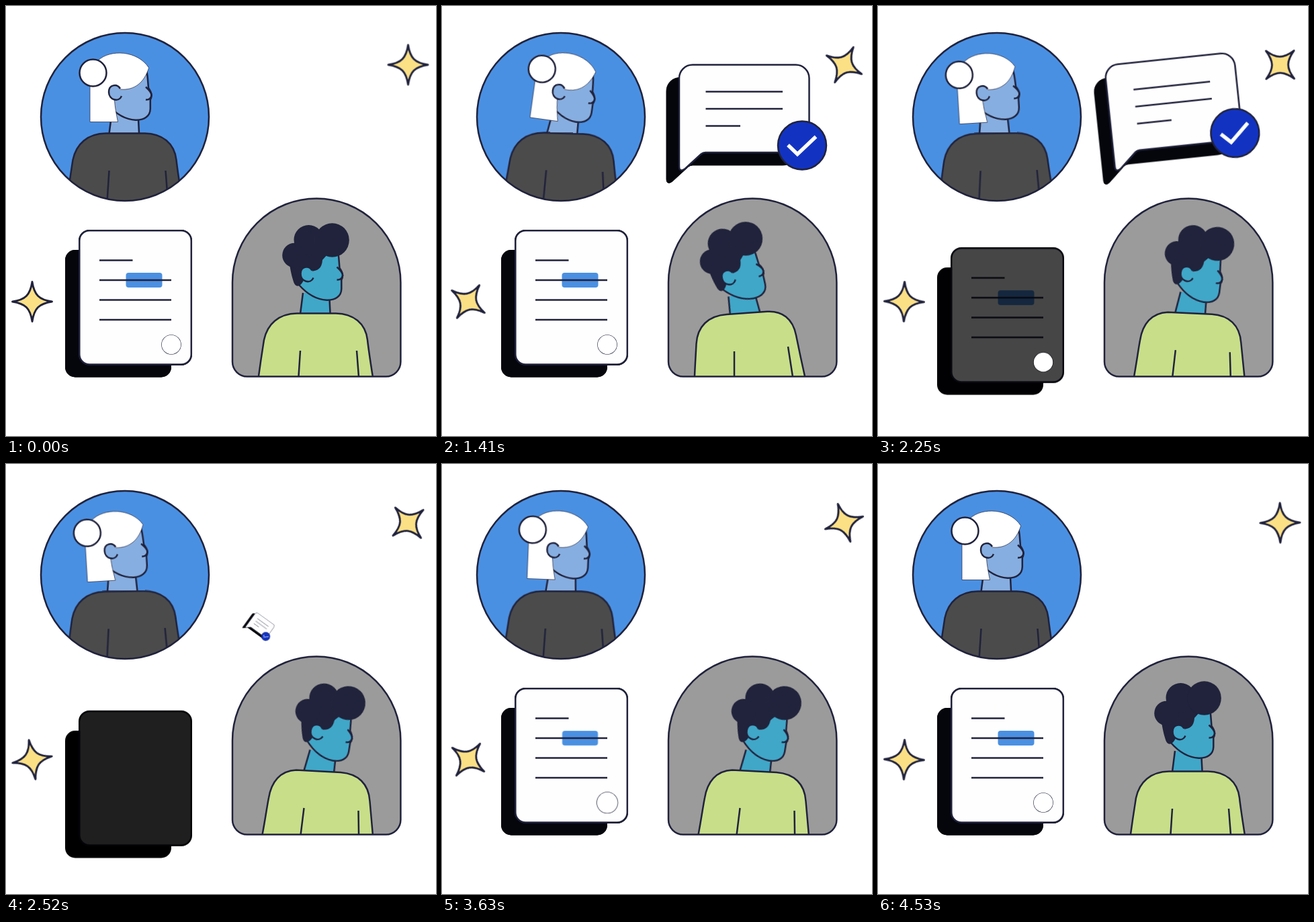
Write an HTML page without scripts that moves like this. It is 640 px wide and 640 px high and loops after 4.56 s.

```html
<!DOCTYPE html>
<html lang="en">
<head>
<meta charset="utf-8">
<title>Team review</title>
<style>
  html, body { margin: 0; width: 100%; height: 100%; overflow: hidden; background: #fff; }
  svg { display: block; width: 100vw; height: 100vh; }

  .ink { stroke: #20223c; stroke-width: 2.5; stroke-linejoin: round; }
  .line { fill: none; }
  .draw { stroke-dasharray: 1; }
  .hair { fill: #20233b; }
  .shade { fill: #05060c; }
  .anim { animation: 4560ms ease-in-out infinite; }

  /* stars */
  .star { stroke-width: 2.9; }
  .spin { animation-timing-function: linear; }
  .right { animation-name: turn-right; }
  .left { animation-name: turn-left; }
  @keyframes turn-right { to { transform: rotate(90deg); } }
  @keyframes turn-left { to { transform: rotate(-180deg); } }

  /* woman */
  .w-head { transform-origin: 176px 213px; animation-name: w-head; }
  .w-body { transform-origin: 176px 300px; animation-name: w-body; }
  .bun { animation-name: bun; }
  @keyframes w-head {
    0%, 93.2%, 100% { transform: translate(0, 0) rotate(0deg); }
    12.3%, 27.4% { transform: translate(0, 0) rotate(8.7deg); }
    47.1%, 66.9% { transform: translate(-1.2px, 0) rotate(-3.5deg); }
    79.6% { transform: translate(0, 0) rotate(2.3deg); }
  }
  @keyframes w-body {
    0%, 93.2%, 100% { transform: rotate(0deg); }
    12.3%, 27.4% { transform: rotate(1.9deg); }
    47.1%, 66.9% { transform: rotate(-.9deg); }
    79.6% { transform: rotate(.4deg); }
  }
  @keyframes bun {
    0%, 93.2%, 100% { transform: translate(0, 0); }
    12.3%, 27.4% { transform: translate(3.5px, -1px); }
    47.1%, 66.9% { transform: translate(-.6px, 0); }
    79.6% { transform: translate(.8px, 0); }
  }

  /* man */
  .m-head { transform-origin: 459px 501px; animation-name: m-head; }
  .m-body { animation-name: m-body; }
  .curl { animation-name: curl; }
  @keyframes m-head {
    0%, 95.4%, 100% { transform: translate(0, 0) rotate(0deg); }
    11.8%, 31.8% { transform: translate(0, 0) rotate(-12.5deg); }
    53.7%, 81.1% { transform: translate(-1.2px, 0) rotate(9deg); }
  }
  @keyframes m-body {
    0%, 95.4%, 100% { d: path("M374.5 562C379 528 382 510 384 497C389 473 406 458 433 457.5L491 457.5C517 458 535 472 538 497C540 515 544 540 547.5 562M438 513L434.8 562M522 513L525.8 562"); }
    11.8%, 31.8% { d: path("M375.5 562C376.5 535 378 515 378.5 503C380 477 396 461 424 459L484 454.8C506 453.5 522 465 527 490C531 510 537 538 542.5 562M435 514L435 562M515 507L523.6 562"); }
    53.7%, 81.1% { d: path("M379.5 562C385 535 388 512 391 497C395 473 408 456.5 432 455.5L498 459C524 461 540 476 541.5 502C543 520 545 540 546.8 562M443.5 512L437.3 562M524.5 516L525.2 562"); }
  }
  @keyframes curl {
    0%, 24%, 40%, 100% { transform: translate(0, 0); }
    12.5% { transform: translate(-5.5px, -3px); }
    53.7%, 81.1% { transform: translate(2px, 1px); }
  }

  /* speech bubble */
  .bubble { transform-origin: 357px 243px; animation-name: bubble; }
  .b1 { animation-name: b1; }
  .b2 { animation-name: b2; }
  .b3 { animation-name: b3; }
  .badge { transform-origin: 536px 207px; animation-name: badge; }
  .tick { animation-name: tick; }
  @keyframes bubble {
    0%, 4% { transform: rotate(45deg) scale(0); animation-timing-function: cubic-bezier(.16, .8, .3, 1); }
    17%, 45% { transform: rotate(0deg) scale(1); }
    49.6% { transform: rotate(-6deg) scale(1); animation-timing-function: ease-in; }
    56%, 100% { transform: rotate(45deg) scale(0); }
  }
  @keyframes b1 { 0%, 10.5% { stroke-dashoffset: 1; } 17.1%, 100% { stroke-dashoffset: 0; } }
  @keyframes b2 { 0%, 8.5% { stroke-dashoffset: 1; } 14.3%, 100% { stroke-dashoffset: 0; } }
  @keyframes b3 { 0%, 6.6% { stroke-dashoffset: 1; } 11.4%, 100% { stroke-dashoffset: 0; } }
  @keyframes badge {
    0%, 18.5% { transform: scale(0); }
    23.5% { transform: scale(1.1); }
    26%, 100% { transform: scale(1); }
  }
  @keyframes tick { 0%, 23% { stroke-dashoffset: 1; } 29%, 100% { stroke-dashoffset: 0; } }

  /* document */
  .doc { animation-name: doc; }
  .fade { animation-name: fade; animation-timing-function: linear; }
  .row { animation-name: row; }
  .mark { transform-origin: 205.5px 408px; animation-name: mark; }
  .stamp { transform-origin: 246px 504px; animation-name: stamp; }
  @keyframes doc {
    0%, 41.67% { transform: translateY(0); visibility: visible; animation-timing-function: ease-in; }
    47.37% { transform: translateY(17px); animation-timing-function: linear; }
    49.34% { transform: translateY(26px); animation-timing-function: ease-out; }
    53.3% { transform: translateY(39px); visibility: visible; animation-timing-function: step-end; }
    53.4% { transform: translateY(39px); visibility: hidden; animation-timing-function: step-end; }
    54.6% { transform: translateY(38px); visibility: visible; animation-timing-function: linear; }
    59.2% { transform: translateY(10px); animation-timing-function: ease-out; }
    62.5%, 63.8% { transform: translateY(-2px); }
    68.4%, 100% { transform: translateY(0); visibility: visible; }
  }
  @keyframes fade {
    0%, 41.67% { opacity: 1; }
    49.34% { opacity: .28; }
    53.3%, 54.6% { opacity: 0; }
    60.1%, 100% { opacity: 1; }
  }
  @keyframes row {
    0%, 53.4% { stroke-dashoffset: 0; animation-timing-function: step-end; }
    53.5%, 61% { stroke-dashoffset: 1; }
    70.2%, 100% { stroke-dashoffset: 0; }
  }
  @keyframes mark {
    0%, 53.4% { transform: scale(1); animation-timing-function: step-end; }
    53.5%, 71% { transform: scale(0); }
    80.5%, 100% { transform: scale(1); }
  }
  @keyframes stamp {
    0%, 53.4% { transform: scale(1); animation-timing-function: step-end; }
    53.5%, 75% { transform: scale(0); }
    79.2% { transform: scale(1.09); }
    82%, 100% { transform: scale(1); }
  }
</style>
</head>
<body>
<svg viewBox="0 0 640 640">
  <defs>
    <clipPath id="disc"><circle cx="177" cy="165" r="125"/></clipPath>
    <path id="arch" d="M337 411.5a125.2 125 0 0 1 250.4 0V529.5a22 22 0 0 1-22 22H359a22 22 0 0 1-22-22Z"/>
    <clipPath id="door"><use href="#arch"/></clipPath>
    <path id="star" class="ink star" fill="#fbe085" d="M0-29.5C3-10 10-3 29.5 0C10 3 3 10 0 29.5C-3 10-10 3-29.5 0C-10-3-3-10 0-29.5Z"/>
    <path id="speech" d="M353 107.5a20 20 0 0 1 20-20H526.5a20 20 0 0 1 20 20V198a20 20 0 0 1-20 20H392q-3.5 0-6.5 2.5L362 242q-4 3.5-7 2q-2-1-2-5Z"/>
    <g id="face" class="ink">
      <path d="M157.5 159L152.5 198H198.5L196.5 159"/>
      <path d="M180 90H208.5C210.5 102 211.5 112 212 122Q216.5 128 216.6 133Q216.5 137 214.8 139.5V153C214.5 164 206 170 193 169.7C178 169 163 160 151.5 147"/>
      <path class="line" d="M208 120.5Q216.5 128 216.6 133Q215.5 140 208 139.5"/>
    </g>
    <path id="ear" class="ink" d="M170 123C165 115 153 117 153 128C153 140 168 144 172 134"/>
  </defs>

  <g transform="translate(598.5 87.5)"><use href="#star" class="anim spin right"/></g>
  <g transform="translate(39 440)"><use href="#star" class="anim spin left"/></g>

  <!-- woman -->
  <circle cx="177" cy="165" r="125" fill="#4a90e2"/>
  <g clip-path="url(#disc)">
    <g class="anim w-head" fill="#87aee0">
      <use href="#face"/>
      <path fill="#fff" stroke="#20223c" stroke-width=".7" d="M125 118V172.5H166.5C164 160 162 150 161.5 140L170 124C192 126 206 113 212.6 92C196 66 155 64 137 81Z"/>
      <use href="#ear"/>
      <circle class="ink anim bun" cx="129.5" cy="99.5" r="20" fill="#fff"/>
    </g>
    <g class="anim w-body">
      <path class="ink" fill="#4b4b4b" transform="translate(-284.5 -268)" d="M374.5 562C379 528 382 510 384 497C389 473 406 458 433 457.5L491 457.5C517 458 535 472 538 497C540 515 544 540 547.5 562M438 513L434.8 562M522 513L525.8 562"/>
    </g>
  </g>
  <circle class="ink line" cx="177" cy="165" r="125"/>

  <!-- man -->
  <use href="#arch" fill="#9b9b9b"/>
  <g clip-path="url(#door)">
    <g class="anim m-head" fill="#40a7c8">
      <use href="#face" x="284.5" y="268"/>
      <g class="hair">
        <path d="M422 384C424 398 427 408 429 413C432 419 439 418 443 408L446 394C460 396 470 394 471 378L480 368L490 350L450 340Z"/>
        <circle cx="429.5" cy="371" r="18.3"/>
        <circle cx="450.5" cy="348" r="22"/>
        <circle class="anim curl" cx="485.5" cy="348.5" r="25.3"/>
      </g>
      <use href="#ear" x="285.5" y="270.5"/>
    </g>
    <path class="ink anim m-body" fill="#c8de89" d="M374.5 562C379 528 382 510 384 497C389 473 406 458 433 457.5L491 457.5C517 458 535 472 538 497C540 515 544 540 547.5 562M438 513L434.8 562M522 513L525.8 562"/>
  </g>
  <use href="#arch" class="ink line"/>

  <!-- document: a solid black base keeps the fade dark -->
  <g class="anim doc">
    <g fill="#000">
      <rect x="88" y="363" width="158" height="189.5" rx="15"/>
      <rect x="108" y="333" width="169" height="202" rx="16"/>
    </g>
    <g class="anim fade">
      <rect class="shade" x="88" y="363" width="158" height="189.5" rx="15"/>
      <rect class="ink" fill="#fefefe" x="109.3" y="334.3" width="166.5" height="199.2" rx="15"/>
      <rect class="anim mark" fill="#4a90e2" x="178.5" y="397" width="54" height="22" rx="4"/>
      <g class="ink line">
        <path class="draw anim row" pathLength="1" d="M139 378.5H188.5"/>
        <path class="draw anim row" pathLength="1" d="M139 408H246"/>
        <path class="draw anim row" pathLength="1" d="M139 437.5H246"/>
        <path class="draw anim row" pathLength="1" d="M139 467H246"/>
      </g>
      <circle class="anim stamp" cx="246" cy="504" r="14.8" fill="#20223c"/>
    </g>
    <circle class="anim stamp" cx="246" cy="504" r="14.2" fill="#fff"/>
  </g>

  <!-- speech bubble -->
  <g class="anim bubble">
    <use href="#speech" class="shade" x="-19" y="19" stroke="#05060c"/>
    <use href="#speech" class="ink" fill="#fefefe"/>
    <g class="ink line">
      <path class="draw anim b1" pathLength="1" d="M392.5 127.5H507"/>
      <path class="draw anim b2" pathLength="1" d="M392.5 153H507"/>
      <path class="draw anim b3" pathLength="1" d="M392.5 178.5H444"/>
    </g>
    <g class="anim badge">
      <circle class="ink" cx="536" cy="207.5" r="36" fill="#1233c2"/>
      <path class="draw anim tick" pathLength="1" fill="none" stroke="#fff" stroke-width="5.5" d="M515 207L529 220.5L556.5 194.5"/>
    </g>
  </g>
</svg>
</body>
</html>
```
